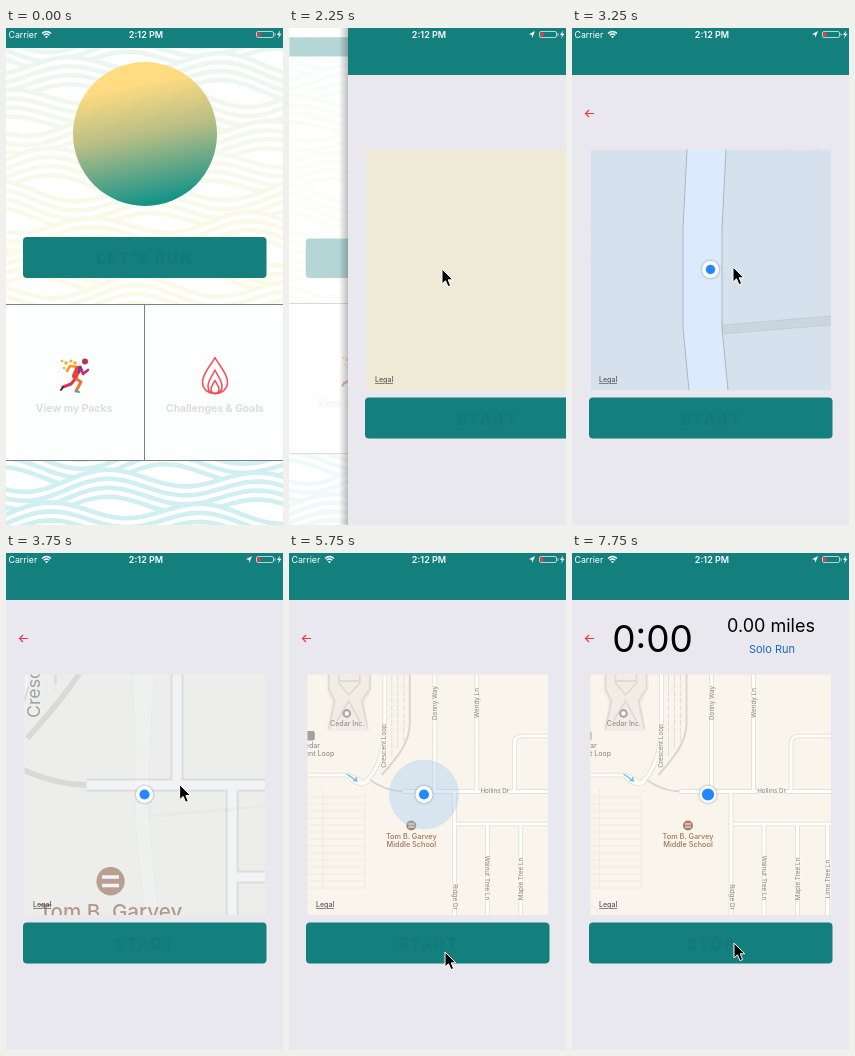
An HTML page for the animation above (8 s loop, 277 px wide and 497 px high).

```html
<!DOCTYPE html>
<html lang="en">
<head>
<meta charset="utf-8">
<title>Running app</title>
<style>
  html, body { margin: 0; width: 100%; height: 100%; overflow: hidden; background: #fff; }
  svg { display: block; width: 100vw; height: 100vh; font-family: Inter, Roboto, sans-serif; }
  .mid { text-anchor: middle; }
  .action { font-size: 16px; font-weight: 800; letter-spacing: 1.5px; fill: #127b79; text-anchor: middle; }
  .cell { font-size: 10.4px; font-weight: 700; fill: #dfdbe6; text-anchor: middle; }
  .place { font-size: 7px; font-weight: 500; fill: #929090; text-anchor: middle; }
  .street { font-size: 6.3px; fill: #85817c; text-anchor: middle; stroke: #faf7f1; stroke-width: 1.5px; paint-order: stroke; }
  .line { fill: none; }
</style>
</head>
<body>
<svg viewBox="0 0 277 497" preserveAspectRatio="none">
  <defs>
    <linearGradient id="sun" x1=".4" x2=".6" y2="1">
      <stop offset=".15" stop-color="#ffdc82"/><stop offset=".5" stop-color="#b8be85"/><stop offset="1" stop-color="#0b9089"/>
    </linearGradient>
    <linearGradient id="sea" gradientUnits="userSpaceOnUse" x1="0" y1="20" x2="0" y2="497">
      <stop offset="0" stop-color="#e9f6f2"/><stop offset=".22" stop-color="#f7f9ea"/>
      <stop offset=".5" stop-color="#fafbe6"/><stop offset=".85" stop-color="#d2f0f1"/><stop offset="1" stop-color="#d0eff1"/>
    </linearGradient>
    <linearGradient id="shade"><stop offset="0" stop-color="#000" stop-opacity="0"/><stop offset="1" stop-color="#000" stop-opacity=".25"/></linearGradient>
    <clipPath id="mapBox"><rect x="18.5" y="121.5" width="240.5" height="240.5"/></clipPath>
    <path id="roads" d="M118 238.5H290 M150 100V238 M192 100V238 M169.5 240V380 M171 271H290 M202.5 271V380 M236 271V380
      M229.5 238V191Q229.5 183 237 183H290 M266 271V380 M100 100V165C100 202 91 222 78 231
      M0 222H60Q72 223 80 232 M62 221Q74 236 84 228"/>
  </defs>

  <g id="home">
    <rect width="277" height="497" fill="#fff"/>
    <g id="waves" stroke="url(#sea)" stroke-width="4.6"></g>
    <rect width="277" height="20" fill="#14807e"/>
    <circle cx="139" cy="106" r="72" fill="url(#sun)"/>
    <g id="runBtn">
      <rect x="17" y="209" width="243.5" height="41" rx="4" fill="#14807e"/>
      <text class="action" x="139" y="236">LET'S RUN</text>
    </g>
    <rect y="276" width="277" height="157" fill="#fdfefe"/>
    <path d="M0 276.5H277M0 432.5H277M138.5 276V433" stroke="#7d7f8a"/>
    <g class="line" stroke-width="3" stroke-linecap="round" stroke-linejoin="round">
      <path d="M70 350L65 356L57 359" stroke="#d8325f"/>
      <path d="M57 359L55 362" stroke="#3a2c6b" stroke-width="2"/>
      <path d="M69 350L75 354L70 363" stroke="#f0752f"/>
      <path d="M70 363L73 364" stroke="#3aa6c8" stroke-width="2"/>
      <path d="M72 339L64 338L61 343" stroke="#f59a26" stroke-width="2.6"/>
      <path d="M75 340L77 346L82 342" stroke="#c62d74" stroke-width="2.6"/>
      <path d="M72 341L69 348" stroke="#ef4136" stroke-width="6"/>
      <path d="M74 339L73 344" stroke="#7b3c94" stroke-width="3"/>
    </g>
    <circle cx="79" cy="333.5" r="3" fill="#b23a4c"/>
    <g fill="#f8ad2d"><circle cx="56" cy="333" r="1.3"/><circle cx="60" cy="335" r="1.8"/><circle cx="65" cy="333" r="1.6"/>
      <circle cx="58" cy="340" r="1.2"/><circle cx="69" cy="335" r="1.8"/></g>
    <g class="line" stroke="#ff4a55" stroke-width="1.5" stroke-linejoin="round">
      <path d="M209 329.5C212 336 221.5 345 221.5 354C221.5 361 216 365.5 209 365.5S196.5 361 196.5 354C196.5 345 206 336 209 329.5Z"/>
      <path d="M209 342C211 347 216 352 216 358C216 363 213 365.5 209 365.5S202 363 202 358C202 352 207 347 209 342Z"/>
      <path d="M209 352.5C210 355 213 358 213 361.5Q212.5 365.5 209 365.5T205 361.5C205 358 208 355 209 352.5Z"/>
    </g>
    <text class="cell" x="68" y="384">View my Packs</text>
    <text class="cell" x="209" y="384">Challenges &amp; Goals</text>
  </g>

  <g id="panel">
    <rect x="-9" width="9" height="497" fill="url(#shade)"/>
    <rect width="277" height="497" fill="#e9e8ee"/>
    <rect width="277" height="47" fill="#14807e"/>
    <path id="back" class="line" d="M22 85.5H13.5M17 82L13.5 85.5L17 89" stroke="#fb3049" stroke-width="1.2"/>
    <g id="stats" class="mid">
      <text x="80.5" y="98.5" font-size="37">0:00</text>
      <text x="199" y="78.5" font-size="18">0.00 miles</text>
      <text x="200" y="100" font-size="11" fill="#1a69b8">Solo Run</text>
    </g>
    <rect x="18.5" y="121.5" width="240.5" height="240.5" fill="#efead5"/>
    <g id="map" clip-path="url(#mapBox)">
      <rect x="18" y="121" width="242" height="242" fill="#f9f5ec"/>
      <g id="city">
        <path d="M42 100V138L47 150L42 178H84L80 150L87 136V100Z" fill="#f1ede4"/>
        <path class="line" d="M44 100V136L50 148L44 176M85 100V136L77 148L83 176M54 100V130L64 142L75 130V100M54 128H75M52 168L64 148L75 168" stroke="#e0dbd1" stroke-width="1.8"/>
        <path class="line" d="M107 122V205M113 122V195M119 122V188" stroke="#e3ded5" stroke-dasharray="6 1.5"/>
        <path class="line" d="M125 100V170C125 190 112 205 97 222M84 226Q100 238 118 238.5" stroke="#dcd7ce" stroke-width="2"/>
        <g id="parking" class="line" stroke="#efebe3"></g>
        <use href="#roads" class="line" stroke="#dedad2" stroke-width="4.6"/>
        <use href="#roads" class="line" stroke="#fffefb" stroke-width="3.2"/>
        <path class="line" d="M62 221L72 228M68 227.5L72 228L71 224" stroke="#67b9ee" stroke-width="1.2"/>
        <g id="loading">
          <rect x="231" y="120" width="60" height="89" fill="#f9f5ec"/>
          <path d="M229 136H270M229 160H270M229 185H270M229 209H270M253.5 120V209" stroke="#cfcbc4"/>
        </g>
        <circle cx="62" cy="160.5" r="3.3" fill="#fff" stroke="#aaa8a6" stroke-width="2.2"/>
        <rect x="20.5" y="178" width="9.5" height="9.5" rx="2" fill="#a3a1a0"/>
        <circle cx="126.5" cy="272.5" r="5" fill="#aa8064"/>
        <path d="M123.5 271H129.5M123.5 274H129.5" stroke="#fff" stroke-width="1.2"/>
        <g id="labels"></g>
      </g>
      <g id="close">
        <rect x="-800" y="-700" width="1900" height="1900" fill="#d5e2ee"/>
        <path d="M150 297L600 260V269L150 306Z" fill="#cad6dd" stroke="#bcc8cf" stroke-width=".7"/>
        <path d="M93 -300L115 122L111 200V300L117 362L190 1100H229L156 362L150 300V200L154 122L176 -300Z" fill="#dbeafc" stroke="#a9b7c1"/>
      </g>
      <circle id="halo" fill="#9cc8f3" fill-opacity=".36"/>
      <g id="dot">
        <circle r="10.5" fill="#345" opacity=".08"/><circle r="9.5" fill="#345" opacity=".1"/>
        <circle r="8.5" fill="#fff"/><circle id="core" fill="#2388fd"/>
      </g>
    </g>
    <text x="27" y="354" font-size="7" font-weight="500" fill="#555" text-decoration="underline">Legal</text>
    <g id="startBtn">
      <rect x="17" y="369.5" width="243.5" height="41" rx="4" fill="#14807e"/>
      <text id="startText" class="action" x="139" y="397"></text>
    </g>
  </g>

  <g id="carrier" fill="#fff">
    <text x="2.5" y="10" font-size="8.8">Carrier</text>
    <path class="line" d="M36 5.5Q40.5 1.5 45 5.5M37.7 7.3Q40.5 4.8 43.3 7.3" stroke="#fff" stroke-width="1.3"/>
    <path d="M39 8.7Q40.5 7.5 42 8.7L40.5 10.3Z"/>
  </g>
  <text class="mid" x="140" y="9.8" font-size="9" font-weight="600" fill="#fff">2:12 PM</text>
  <path id="gps" d="M246 3L240 6.3L242.8 6.8L243.3 9.8Z" fill="#fff"/>
  <rect x="250.5" y="3.5" width="17" height="6" rx="1.5" fill="none" stroke="#b6d4d3"/>
  <path d="M269 5.2V7.8" stroke="#b6d4d3"/>
  <rect x="251.5" y="4.5" width="3" height="4" fill="#fb3240"/>
  <path d="M274 2.5L271 7H273L272 10.5L275.5 5.8H273.3Z" fill="#fff"/>

  <path id="cursor" d="M0 0V15L3.5 11.8L6 17.6L8.6 16.5L6.2 10.8H10.8Z" fill="#000" stroke="#fff"/>
</svg>
<script>
const $ = id => document.getElementById(id);
const LOOP = 8000, STEP = 250;

// Overlapping bands of swell, each row shifted sideways
let waves = '';
for (let row = 0; row < 17; row++) {
  for (let k = 0; k < 4; k++) {
    let d = '';
    for (let x = -5; x <= 285; x += 5) {
      const y = 4 + row * 32 + k * 9 + 9 * Math.sin(x / 25 + row * 2.3) + 3 * Math.sin(x / 47 + row);
      d += (d ? 'L' : 'M') + x + ' ' + y.toFixed(1);
    }
    waves += `<path d="${d}${k ? '' : 'V600H-5Z'}" fill="${k ? 'none' : '#fff'}"/>`;
  }
}
$('waves').innerHTML = waves;

let lots = 'M80 240V336M38 236V336';
for (let y = 244; y < 338; y += 7) lots += `M18 ${y}H80`;
$('parking').innerHTML = `<path d="${lots}M0 350Q40 340 42 380M68 380V360"/>`;

const label = (cls, x, y, text, turn = 0, extra = '') =>
  `<text class="${cls}" transform="translate(${x} ${y}) rotate(${turn})" ${extra}>${text}</text>`;
const brown = 'style="fill:#a5735a;font-size:7.3px"';
$('labels').innerHTML =
  label('place', 62.5, 173, 'Cedar Inc.') +
  label('place', 25, 195, 'Cedar') +
  label('place', 25, 203, 'Crescent Loop') +
  label('place', 126.5, 286, 'Tom B. Garvey', 0, brown) +
  label('place', 126.5, 293.5, 'Middle School', 0, brown) +
  label('street', 101.5, 193, 'Crescent Loop', -90) +
  label('street', 152, 150, 'Donny Way', -90) +
  label('street', 194, 150, 'Wendy Ln', -90) +
  label('street', 210, 240, 'Hollins Dr') +
  label('street', 168, 344, 'Ridge Dr', 90) +
  label('street', 200.5, 325, 'Walnut Tree Ln', 90) +
  label('street', 238, 326, 'Maple Tree Ln', -90, 'id="late"') +
  label('street', 268, 326, 'Lime Tree Ln', -90);

// Linear interpolation through [time, value] pairs
function track(t, keys) {
  if (t <= keys[0][0]) return keys[0][1];
  for (let i = 1; i < keys.length; i++) {
    const [a, u] = keys[i - 1], [b, v] = keys[i];
    if (t <= b) return u + (v - u) * (t - a) / (b - a);
  }
  return keys[keys.length - 1][1];
}
const move = (id, value) => $(id).setAttribute('transform', value);
const fade = (id, value) => $(id).setAttribute('opacity', value);
const zoom = (s, x, y) => `translate(${x} ${y}) scale(${s}) translate(${-x} ${-y})`;

const pointer = [
  [750, 150, 157], [1000, 152, 192], [1250, 153, 232], [1500, 153, 240], [2250, 153, 241],
  [3000, 157, 241], [3250, 161, 239], [4000, 180, 228], [4750, 194, 222], [5000, 194, 236],
  [5250, 187, 290], [5500, 168, 360], [5750, 156, 399], [6250, 157, 401], [6750, 160, 397], [7750, 162, 390]
];
const pointerX = pointer.map(p => [p[0], p[1]]);
const pointerY = pointer.map(p => [p[0], p[2]]);

function draw(t) {
  const push = track(t, [[1750, 0], [2000, .2], [2250, .787], [2500, 1]]);
  move('home', `translate(${-6 * push} 0) ${zoom(1 - .047 * push, 138.5, 248.5)}`);
  fade('home', 1 - .87 * push);
  fade('runBtn', t === 1750 ? .4 : 1);
  move('panel', `translate(${(1 - push) * 277} 0)`);
  fade('panel', push > 0 ? 1 : 0);
  fade('carrier', push > 0 && push < 1 ? .5 : 1);
  fade('gps', push > 0 ? 1 : 0);

  fade('back', t >= 3000 ? 1 : 0);
  fade('map', t >= 3000 ? 1 : 0);
  const level = track(t, [[3250, 3], [4250, 0]]);
  const pan = track(t, [[4750, 0], [5750, -4.2], [7750, -10.5]]);
  move('city', `translate(${pan} 0) ${zoom(2 ** level, 138.5, 242)}`);
  move('close', zoom(2 ** (level - 3), 138.5, 242));
  fade('close', track(t, [[3250, 1], [4000, 0]]));
  fade('loading', t < 5000 ? 1 : 0);
  fade('late', t < 5000 ? 0 : 1);

  const x = track(t, [[4750, 138.5], [5750, 135], [7750, 136]]);
  move('dot', `translate(${x} 241.5)`);
  $('core').setAttribute('r', 5.4 + .7 * Math.cos((t - 4750) / 3000 * 2 * Math.PI));
  move('halo', `translate(${x} 241.5)`);
  $('halo').setAttribute('r', track(t, [[5250, 0], [5500, 26], [5750, 35], [6000, 35], [6500, 0]]));

  const running = t >= 7000;
  fade('stats', running ? 1 : 0);
  fade('startBtn', t === 6750 ? .4 : 1);
  $('startText').textContent = running ? 'STOP' : 'START';

  fade('cursor', t >= 750 ? 1 : 0);
  move('cursor', `translate(${track(t, pointerX)} ${track(t, pointerY)})`);
}

const begin = performance.now();
function tick() {
  const t = (performance.now() - begin) % LOOP;
  draw(Math.floor(t / STEP) * STEP);
  requestAnimationFrame(tick);
}
tick();
</script>
</body>
</html>
```
